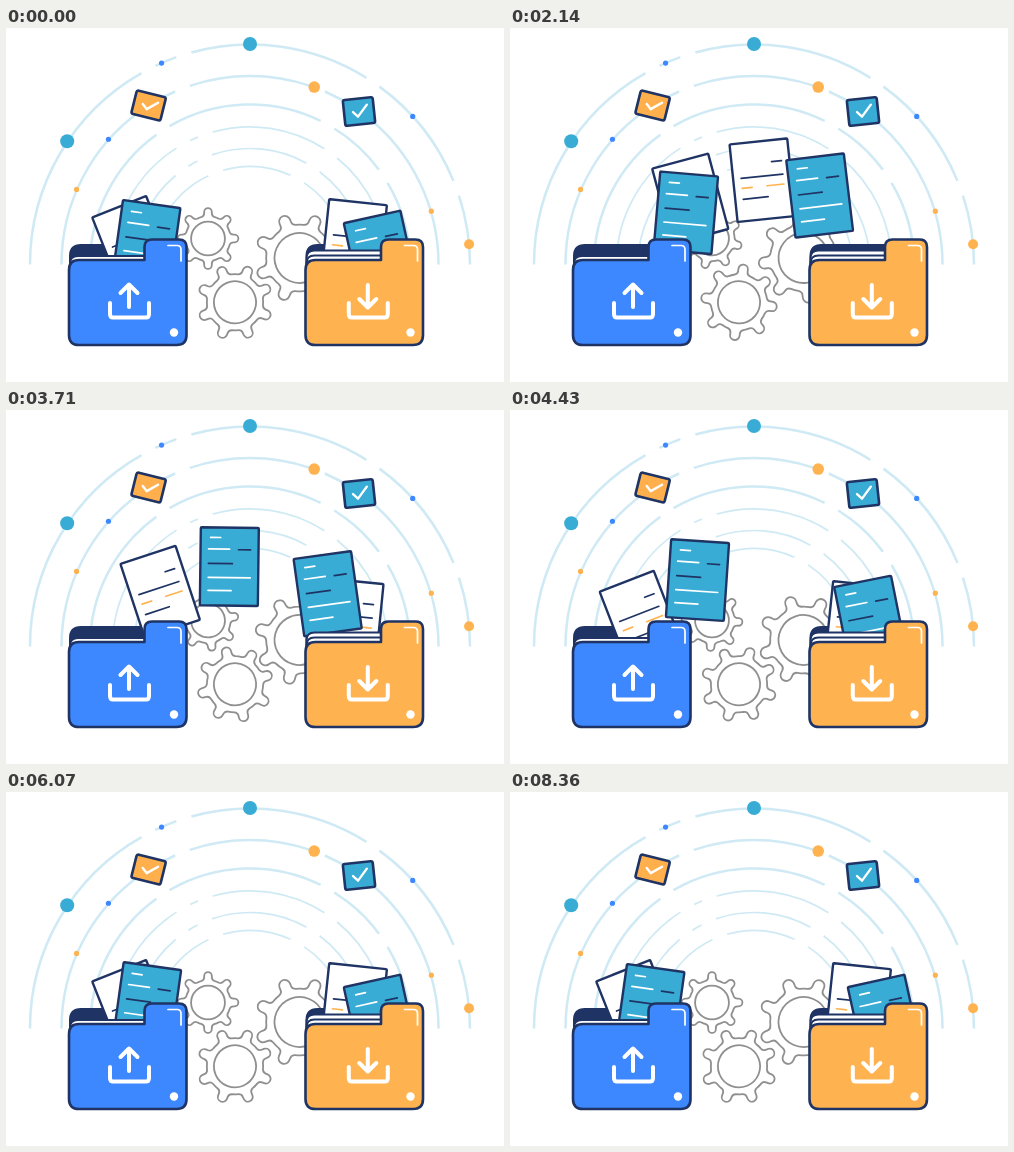
Animation of 498 by 354 pixels, one loop 8430 ms. Source, as an HTML page:

```html
<!DOCTYPE html>
<html lang="en">
<head>
<meta charset="utf-8">
<title>File exchange</title>
<style>
  html, body { margin: 0; width: 100%; height: 100%; overflow: hidden; background: #fff; }
  svg { display: block; width: 100vw; height: 100vh; }
</style>
</head>
<body>
<svg id="stage" viewBox="0 0 498 354" fill="none" stroke-linecap="round" stroke-linejoin="round">
  <g id="arcs" stroke="#cfeaf4" stroke-linecap="butt"></g>
  <g id="dots"></g>
  <g stroke="#1f3464" stroke-width="2.6">
    <g transform="translate(142.6 77.5) rotate(14)">
      <rect x="-15" y="-12" width="30" height="24" rx="2" fill="#ffb04d"/>
      <path d="M-6 0 L-1 4 L8.500 -5" stroke="#fff" stroke-width="2.400"/>
    </g>
    <g transform="translate(353 83.5) rotate(-6)">
      <rect x="-15" y="-13" width="30" height="26" rx="2" fill="#38acd4"/>
      <path d="M-6 0 L-1.500 5 L8.500 -6" stroke="#fff" stroke-width="2.400"/>
    </g>
  </g>
  <g id="gears" fill="#fff" stroke="#8f8f8f" stroke-width="1.8"></g>
  <g id="backs"></g>
  <g id="papers"></g>
  <g id="fronts"></g>
</svg>
<script>
const LOOP = 8430;
const NAVY = '#1f3464', CYAN = '#38acd4', BLUE = '#3d87ff', ORANGE = '#ffb350', WHITE = '#fff';
const byId = id => document.getElementById(id);
const mix = (a, b, p) => a + (b - a) * p;

function add(parent, tag, attrs) {
  const node = document.createElementNS('http://www.w3.org/2000/svg', tag);
  for (const key in attrs) node.setAttribute(key, attrs[key]);
  return parent.appendChild(node);
}

function polar(r, deg) {
  const a = deg * Math.PI / 180;
  return [r * Math.cos(a), -r * Math.sin(a)];
}
const at = (r, deg) => polar(r, deg).map(v => v.toFixed(2)).join(' ');

// Half rings around one centre: radius, then the angles where a gap sits.
const centre = 'translate(244 236.5)';
const rings = [
  [220, 117.5, 107.5, 56, 20.3], [188.5, 123, 111, 69, 54], [160, 123, 61, 33.5],
  [137.6, 119, 109, 54], [116, 126, 113, 57], [98, 110.5, 61]
];
byId('arcs').setAttribute('transform', centre);
for (const [r, ...gaps] of rings) {
  const halfGap = 450 / r;
  const ends = [180, ...gaps.flatMap(a => [a + halfGap, a - halfGap]), 0];
  let d = '';
  for (let i = 0; i < ends.length; i += 2) d += `M${at(r, ends[i])} A${r} ${r} 0 0 1 ${at(r, ends[i + 1])}`;
  add(byId('arcs'), 'path', { d, 'stroke-width': r > 150 ? 2.5 : 1.7 });
}

function addDots(fill, size, orbit, ...angles) {
  for (const angle of angles) {
    const [cx, cy] = polar(orbit, angle);
    add(byId('dots'), 'circle', { cx, cy, r: size, fill });
  }
}
byId('dots').setAttribute('transform', centre);
addDots(CYAN, 7, 220.5, 90, 146);
addDots(BLUE, 2.6, 220, 113.7, 42.3);
addDots(BLUE, 2.6, 189, 138.5);
addDots(ORANGE, 5, 220, 5.3);
addDots(ORANGE, 5.8, 188.7, 70.1);
addDots(ORANGE, 2.6, 189, 16.4, 156.6);

// Gear outline around the origin: eight round-tipped teeth with soft valleys.
function gearPath(tip) {
  const valley = tip * 0.74, half = tip * 0.125, neck = tip - half;
  const arc = `A${valley} ${valley} 0 0 0 `;
  let d = '';
  for (let axis = 0; axis < 360; axis += 45) {
    const side = (r, sign) => at(Math.hypot(r, half), axis + sign * Math.atan2(half, r) * 180 / Math.PI);
    d += (axis ? arc : 'M') + at(valley, axis - 16);
    d += `Q${side(valley, -1)} ${side(valley + 3, -1)} L${side(neck, -1)}`;
    d += `A${half} ${half} 0 0 0 ${side(neck, 1)} L${side(valley + 3, 1)}`;
    d += `Q${side(valley, 1)} ${at(valley, axis + 16)}`;
  }
  return d + arc + at(valley, -16) + 'Z';
}

const gears = [
  { x: 202, y: 210.5, tip: 30.5, phase: 0, dir: 1 },
  { x: 293.5, y: 230, tip: 45, phase: 23, dir: 1 },
  { x: 229, y: 274.3, tip: 38, phase: 22, dir: -1 }
];
for (const gear of gears) {
  gear.node = add(byId('gears'), 'g', {});
  add(gear.node, 'path', { d: gearPath(gear.tip) });
  add(gear.node, 'circle', { r: gear.tip * 0.555 });
}

function buildFolder(x, color, sheets, arrowHead, iconShift) {
  const transform = `translate(${x} 0)`;
  add(byId('backs'), 'path', {
    transform, d: 'M1 240 V228 Q1 217 12 217 H90 V240 Z', fill: NAVY, stroke: NAVY, 'stroke-width': 2
  });
  const front = add(byId('fronts'), 'g', { transform, stroke: NAVY, 'stroke-width': 2.6 });
  for (const y of sheets) {
    add(front, 'path', {
      d: `M1 ${y + 13} V${y + 8} Q1 ${y} 9 ${y} H86 V${y + 13} Z`, fill: WHITE, 'stroke-width': 1.8
    });
  }
  add(front, 'path', {
    d: 'M0 242 Q0 232 10 232 H75.500 V219 Q75.500 211.500 83 211.500 H110 ' +
       'Q117.500 211.500 117.500 219 V307 Q117.500 317 107.500 317 H10 Q0 317 0 307 Z',
    fill: color
  });
  add(front, 'path', { d: 'M99 217.500 H108 Q112 217.500 112 221.500 V233', stroke: WHITE, 'stroke-width': 1.7 });
  add(front, 'circle', { cx: 105, cy: 304.5, r: 4.2, fill: WHITE, stroke: 'none' });
  add(front, 'path', {
    d: 'M41 275 V286 Q41 289.500 44 289.500 H77 Q80 289.500 80 286 V275 M60 279 V257 ' + arrowHead,
    stroke: WHITE, 'stroke-width': 4, transform: `translate(${iconShift} 0)`
  });
}
buildFolder(63, BLUE, [228], 'M51.500 265 L60 256.500 L68.500 265', 0);
buildFolder(299.5, ORANGE, [222.5, 227.5], 'M51.500 271 L60 279.500 L68.500 271', 2.3);

// Each kind of sheet rests in both folders; marks are drawn from its top left corner.
const plain = {
  fill: WHITE,
  left: { x: 127.5, y: 215, tilt: -21.6 },
  right: { x: 348, y: 213, tilt: 6 },
  marks: { [NAVY]: 'M40 21.500h10 M8 35h42 M8 56h25', [ORANGE]: 'M8 45h10 M33 45h17' }
};
const tinted = {
  fill: CYAN,
  left: { x: 140.3, y: 214.7, tilt: 8 },
  right: { x: 374.5, y: 227, tilt: -12.5 },
  marks: { [WHITE]: 'M10 10h10 M8 21.500h21 M8 50h42 M8 63h23', [NAVY]: 'M38 22h12 M8 36h24' }
};

// sharp: how late and fast the crossing is; lift and round: shape of the arch.
const flights = [
  { kind: plain, from: 'left', to: 'right', time: 5000, sharp: 4, lift: 61, round: 1.05 },
  { kind: tinted, from: 'left', to: 'right', time: 6100, sharp: 2.8, lift: 54, round: 0.8 },
  { kind: plain, from: 'right', to: 'left', time: 4700, sharp: 1.5, lift: 62.5, round: 0.75 },
  { kind: tinted, from: 'right', to: 'left', time: 6200, sharp: 1.5, lift: 67, round: 0.8 }
];
for (const flight of flights) {
  const { fill, marks } = flight.kind;
  flight.node = add(byId('papers'), 'g', {});
  const sheet = add(flight.node, 'g', { transform: 'translate(-29 -39)', 'stroke-width': 1.7 });
  add(sheet, 'rect', { width: 58, height: 78, rx: 1, fill, stroke: NAVY, 'stroke-width': 2.4 });
  for (const stroke in marks) add(sheet, 'path', { d: marks[stroke], stroke });
}

function easeInOut(u, sharp) {
  const done = u ** sharp, left = (1 - u) ** sharp;
  return done / (done + left);
}

function place(node, x, y, angle) {
  node.setAttribute('transform', `translate(${x} ${y}) rotate(${angle})`);
}

// Gears advance one tooth per stage, from rest to rest over the whole loop.
const stages = [0, 4250, 6070, LOOP];
function gearTurn(time) {
  const i = time < stages[1] ? 0 : time < stages[2] ? 1 : 2;
  const span = stages[i + 1] - stages[i], u = (time - stages[i]) / span;
  const speed = n => n % 3 ? 2 / (stages[n + 1] - stages[n - 1]) * span : 0;
  const bend = u * (1 - u) * ((1 - u) * speed(i) - u * speed(i + 1));
  return 45 * (i + u * u * (3 - 2 * u) + bend);
}

function render(time) {
  const turn = gearTurn(time);
  for (const { node, x, y, phase, dir } of gears) place(node, x, y, phase + dir * turn);
  for (const { node, kind, from, to, time: length, sharp, lift, round } of flights) {
    const a = kind[from], b = kind[to];
    const p = easeInOut(Math.min(time / length, 1), sharp);
    const arch = lift * (4 * p * (1 - p)) ** round;
    place(node, mix(a.x, b.x, p), mix(a.y, b.y, p) - arch, mix(a.tilt, b.tilt, p));
  }
}

const start = performance.now();
function tick() {
  render((performance.now() - start) % LOOP);
  requestAnimationFrame(tick);
}
tick();
</script>
</body>
</html>
```
